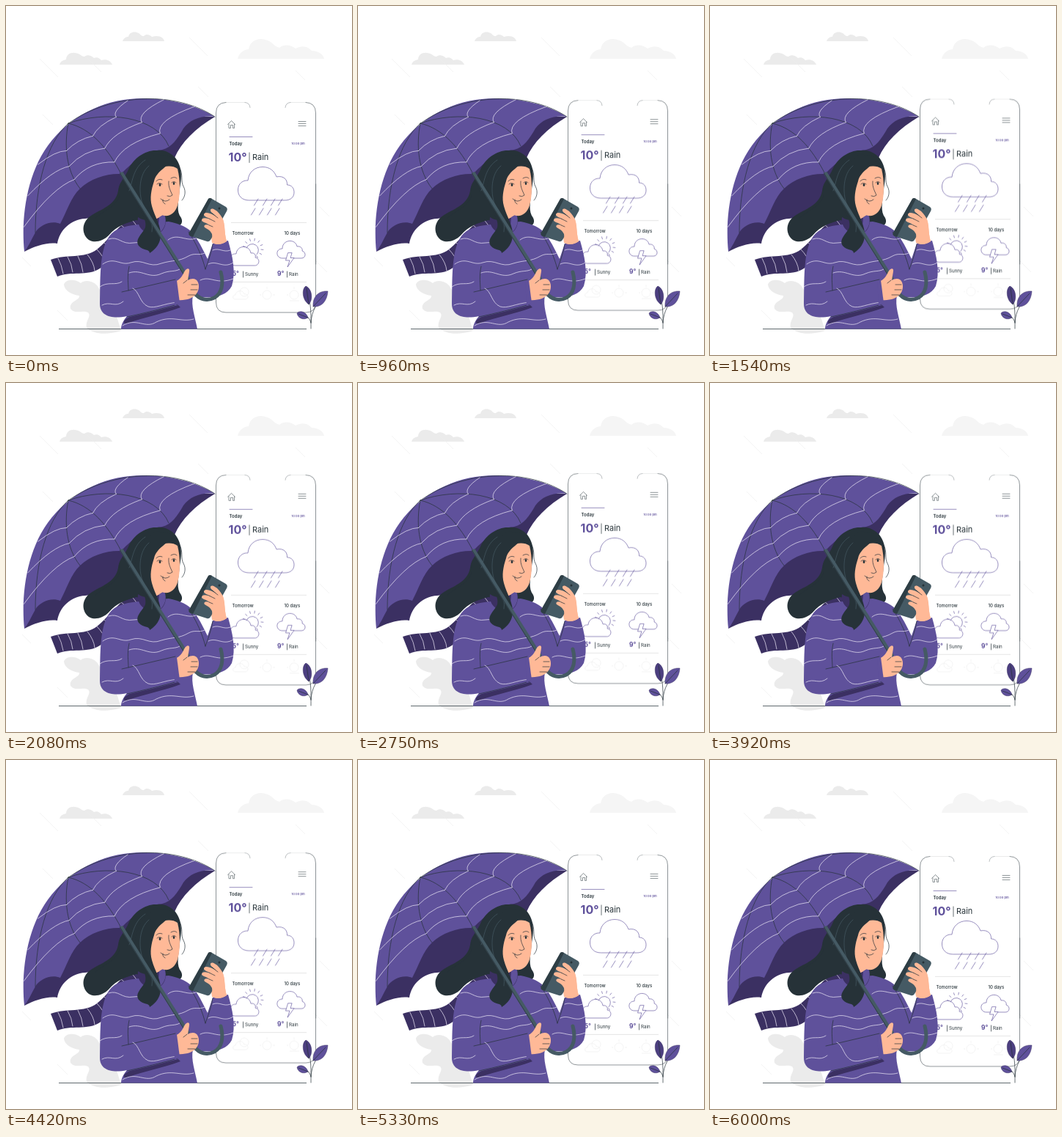
Write an HTML page that moves like this. It is 472 px wide and 476 px high and loops after 6040 ms.

```html
<!DOCTYPE html>
<html lang="en">
<head>
<meta charset="utf-8">
<title>Rainy day forecast</title>
<style>
  html, body { margin: 0; width: 100%; height: 100%; overflow: hidden; background: #fff; }
  svg { display: block; width: 472px; height: 476px; }
  text { font-family: Inter, "Open Sans", sans-serif; fill: #263238; }
  .violet { fill: #5f519b; }
  .deep { fill: #3b3062; }
  .dark { fill: #263238; }
  .slate { fill: #455a64; }
  .skin { fill: #ffb997; }
  .pale { fill: #ebebeb; }
  .line { fill: none; stroke: #263238; stroke-width: .7; stroke-linecap: round; stroke-linejoin: round; }
  .icon { fill: none; stroke: #5f519b; stroke-width: .65; stroke-linecap: round; stroke-linejoin: round; }
  .white { fill: none; stroke: #e6e1f2; stroke-width: .75; stroke-linecap: round; }
  .faint { fill: none; stroke: #ededed; stroke-width: .6; }
  .bold { font-weight: 700; }
  .semi { font-weight: 600; }
  text.violet { fill: #5f519b; }
</style>
</head>
<body>
<svg viewBox="0 0 472 476">
  <!-- sky -->
  <path class="pale" d="M73 80C75 74 79 74 82 73C82 65 90 62 97 64.500C102 66 103 69 107 69C112 65 118 69 120 71C125 69 128 72 130 74C137 72 143 75 145 80Z"/>
  <path class="pale" d="M159 48C161 43 164 42 167 42C168 35 176 34 181 37C184 39 184 41 188 41C192 37 197 40 199 42C209 39 215 43 216 48Z"/>
  <path fill="#f5f5f5" d="M316 72C318 64 323 60 331 59C333 46 346 42 357 47C365 50 365 55 373 57C380 51 390 54 395 58C404 53 412 55 417 61C426 61 433 66 434 72Z"/>
  <g id="drizzle" class="faint"></g>

  <!-- pale bush -->
  <path class="pale" d="M157 443C137 449 120 448 110 439C108 428 117 424 112 418C104 414 94 421 88 413C86 402 101 402 100 395C91 394 80 389 79 380C81 372 95 372 102 378C109 372 122 376 126 384L150 420Z"/>
  <path d="M72 440.500H410" stroke="#37434a" stroke-width=".8"/>

  <!-- forecast panel -->
  <g id="panel">
    <g class="line" stroke-width=".6" opacity=".75">
      <path d="M300 131.500Q286.500 132 286.500 146V404Q286.500 418 300 418H409Q422.500 418 422.500 404V146Q422.500 132 409 131.500"/>
      <path d="M300 131.500H326M388 131.500H409" opacity=".2"/>
      <path d="M326 131.500Q332.500 132 333 138.500M388 131.500Q381.500 132 381 138.500" opacity=".6"/>
    </g>
    <path class="line" stroke-width=".5" opacity=".75" d="M302.500 161.500L307.500 156.500L312.500 161.500M304 161V166.500H306.500V162.500H309.500V166.500H311.500V161M399 157.500H409M399 160.500H409M399 163.500H409"/>
    <path class="icon" d="M305 178.500H336"/>
    <text class="semi" x="304.500" y="190" font-size="6">Today</text>
    <text class="violet semi" x="389.500" y="189.500" font-size="4">10:00 pm</text>
    <text class="violet bold" x="303.500" y="212" font-size="16">10°</text>
    <path class="line" stroke-width=".5" d="M332 200V213.500"/>
    <text x="336" y="210" font-size="11">Rain</text>
    <path class="icon" d="M331 265C322 265 316 259 316.500 250C317 242 323 237.500 330 238C331 226 340 219.500 350 219.500C360 219.500 366 225 369 233C379 231 384 237 383.500 244C390 244 393 249 393 254C393 261 388 265 381 265Z"/>
    <g id="drops" class="icon"></g>
    <path class="faint" style="stroke:#d5d5d5" d="M307 295.500H410M307 376.500H410"/>
    <text x="308.500" y="312" font-size="6" font-weight="500">Tomorrow</text>
    <text x="379.500" y="312" font-size="6" font-weight="500">10 days</text>
    <g id="sunRays" class="icon"></g>
    <path class="icon" d="M328 330A8.500 8.500 0 1 1 342 339"/>
    <path class="icon" d="M312 354C305 354 303 345 307 341C309 338 312 338 314 338C315 326 332 325 334 337C340 336 341 341 340 343C348 345 345 354 340 354Z"/>
    <path class="icon" d="M382 344H377C368 344 367 331 377 331C377 318 395 317 397 328C402 327 405 331 404 334C410 336 409 344 403 344H393"/>
    <path class="icon" d="M384.500 337L381.500 347H387L384 356L393 343.500H388L390 337Z"/>
    <text class="violet bold" x="305" y="368" font-size="8.500">15°</text>
    <text class="violet bold" x="370" y="368" font-size="8.500">9°</text>
    <path class="line" stroke-width=".5" d="M323.500 362V370M383.500 362V370"/>
    <text x="326" y="368" font-size="6.200">Sunny</text>
    <text x="386" y="368" font-size="6.200">Rain</text>
    <g class="faint">
      <path d="M313 400C308 400 309 394 313 394C314 387 324 387 325 393C331 392 332 400 326 400Z"/>
      <circle cx="325" cy="390" r="6"/><circle cx="356" cy="394" r="6"/><circle cx="393" cy="394" r="6"/>
      <path d="M356 383V386M346 394H348M364 394H367M393 383V386M383 394H385M401 394H404M387 402H400"/>
    </g>
  </g>
  <path class="line" stroke-width=".6" opacity=".55" d="M422.700 243V352"/>

  <!-- umbrella -->
  <path class="deep" d="M25 335C39 328 55 322 70 324C73 306 88 291 108 290C128 288 143 270 164 258L230 207C239 186 258 167 285 151L230 150L160 200L90 235L35 290Z"/>
  <path class="violet" d="M25 335C20 287 29 224 62 184C94 145 140 126 186 126C222 126 258 134 285 151C266 149 251 155 242 167C234 181 226 193 213 196C193 198 174 211 157 229C138 228 115 235 101 249C89 260 83 280 74 297C61 292 46 299 40 309C34 320 30 329 25 335Z"/>
  <path class="line" d="M84 161C120 134 174 122 220 128C249 132 270 141 285 151"/>
  <g id="canopy"></g>

  <!-- scarf tail -->
  <path class="deep" d="M184 286C158 290 142 318 124 332C107 345 82 338 61 346L70 369C88 361 112 369 128 358C145 347 152 321 190 310Z"/>
  <path class="white" stroke-width=".6" d="M71 344Q76 353 78 365M84 342Q90 352 91 363M98 341Q104 352 105 363M111 339Q120 350 121 361M124 332Q133 341 136 352M134 323Q145 331 148 340M145 311Q155 320 159 326M157 299Q168 307 172 315M170 290Q179 298 184 311"/>

  <!-- hair behind -->
  <path class="dark" d="M206 197C191 196 174 207 167 223C160 238 155 239 153 252C150 270 133 276 119 284C106 291 102 304 109 315C116 325 131 322 140 313C151 300 163 296 178 292L214 300C232 306 244 299 239 289C232 280 235 268 237 250C239 236 242 222 231 207C224 199 214 196 206 197Z"/>
  <path class="line" d="M237 221C242 230 238 239 242 246C246 253 244 261 240 265M155 249C160 270 134 278 121 290"/>

  <!-- sweater -->
  <path class="violet" d="M148 307C163 298 180 299 193 296L222 294C237 297 250 302 257 313C265 324 270 335 275 345L282 324L303 320C309 341 314 363 308 382C300 398 276 400 255 395C252 409 258 424 261 440.500H157C157 433 162 427 165 423C146 427 128 424 128 406C129 370 126 322 148 307Z"/>
  <path class="deep" d="M169 424C190 419 212 414 235 408L238 411C214 420 190 424 165 433C157 434 161 427 169 424Z"/>
  <path class="line" d="M168 355C165 369 167 379 167 388L231 373M167 388L158 390M165 424C188 419 213 413 234 407M249 308C261 326 268 343 272 359M282 325C280 337 276 348 272 359"/>
  <path class="white" d="M140 318C154 313 157 326 174 323C186 321 191 329 201 325M221 319C234 309 246 322 259 317M132 352C148 341 156 355 170 350C187 344 195 358 212 351C229 346 235 349 249 341C258 336 263 341 271 337M128 383C139 375 149 382 158 376M131 408C142 402 149 412 160 403M173 385C182 389 182 405 194 410C204 413 214 406 234 404M168 364C185 358 195 373 212 365C224 360 230 363 237 359M159 436C178 424 190 441 205 431C226 421 239 432 256 427M282 333C291 329 297 337 306 333M276 352C288 346 296 359 310 350M265 374C279 367 287 381 310 372"/>

  <!-- neck and scarf collar -->
  <path class="skin" d="M190 263L191 291C200 299 213 294 217 285V268Z"/>
  <path class="deep" d="M180 288C191 296 207 292 215 284C221 293 217 307 207 311C192 313 178 304 180 288Z"/>
  <path class="violet" d="M209 288L216 284C220 293 217 305 207 311Z"/>

  <!-- face -->
  <path class="skin" d="M193 238C200 222 222 213 234 222C238 238 238 258 234 272C231 282 224 287 216 286C202 283 192 276 189 264Z"/>
  <path class="dark" d="M231 207C222 218 205 225 202 239C198 251 196 262 199 273C203 288 212 300 211 314C210 324 205 331 196 337C196 331 187 334 181 327C175 318 187 310 190 302C193 290 181 280 178 267C172 247 178 216 205 202Z"/>
  <path class="line" stroke-width="1" d="M205 239Q208 235 213 237M225 235Q230 232 233 235M222 239C221 247 225 253 227 258Q224 261 220 259M211 263Q217 269 223 264M214 264Q213 268 217 270"/>
  <ellipse class="dark" cx="210" cy="244" rx="1.400" ry="2"/>
  <ellipse class="dark" cx="229" cy="242" rx="1.300" ry="2"/>
  <path class="line" d="M206 243Q209 240 213 243M226 241Q229 238 232 241"/>
  <path class="line" style="stroke:#455a64" stroke-width=".5" d="M195 218C181 229 181 255 186 269C191 281 202 291 199 308M190 210C173 221 173 239 168 252"/>

  <!-- shaft, hook and hand -->
  <path d="M157 227L249 373" fill="none" stroke="#455a64" stroke-width="5"/>
  <path d="M155.500 228L246 372" class="line" stroke-width=".6"/>
  <path d="M257 391C263 400 274 403 284 398C295 392 297 378 293 363" fill="none" stroke="#455a64" stroke-width="5" stroke-linecap="round"/>
  <path class="skin" d="M230 376C237 374 240 369 243 363C246 357 251 357 250 362L248 374C253 371 260 371 262 377C264 382 263 388 260 392C256 399 244 402 234 401Z"/>
  <path class="line" stroke-width=".5" d="M247 374L242 378M253 380H261M252 387H261M248 394H258"/>
  <path class="violet" d="M228 376L233 374L237 405L230 409Z"/>

  <!-- handset -->
  <path class="skin" d="M281 323L279 309L272 300L291 281L296 291C299 303 298 311 301 321C294 326 287 326 281 323Z"/>
  <path class="slate" d="M276 263Q278 261 281 263L300 274Q303 276 301 280L279 319Q277 322 274 321L252 314Q248 312 250 309Z"/>
  <path class="dark" d="M276 263L250 309Q248 312 252 314L255 315L281 263Q278 261 276 263Z" opacity=".7"/>
  <circle class="dark" cx="291" cy="276" r="1.500"/>
  <path class="skin" d="M285 278C279 274 277 279 281 282L287 287C280 283 272 280 270 284C269 287 275 288 281 292C274 289 268 288 267 292C267 295 273 295 278 299C272 297 269 299 271 302C274 304 278 305 281 311L282 323C288 326 296 325 301 321C297 308 300 298 295 289C292 284 289 280 285 278Z"/>
  <path class="line" stroke-width=".5" d="M281 283L289 289M277 290L285 294M277 299L282 301"/>

  <!-- sprig -->
  <path class="line" d="M416 440C416 424 417 409 411 389M416 432C417 415 424 406 435 393M416 432C414 424 408 421 400 420"/>
  <g class="violet" stroke="#3b3062" stroke-width=".5">
    <path d="M409 382C403 386 404 401 413 407C419 401 418 386 409 382Z" fill="#4c3f80"/>
    <path d="M439 389C426 388 418 397 419 410C431 411 438 402 439 389Z"/>
    <path d="M397 419C400 415 409 416 412 425C406 429 398 426 397 419Z"/>
  </g>
  <path class="line" stroke-width=".5" d="M410 385L413 407M436 392L419 410M399 420L412 425"/>
</svg>
<script>
const NS = 'http://www.w3.org/2000/svg';
const byId = id => document.getElementById(id);

function addPath(parent, d, cls) {
  const p = document.createElementNS(NS, 'path');
  p.setAttribute('d', d);
  if (cls) p.setAttribute('class', cls);
  parent.append(p);
}

// Slanted streaks: x, y, length along each axis
[[46, 72, 25], [250, 43, 25], [50, 148, 14], [110, 70, 20], [395, 88, 13], [428, 274, 13],
 [22, 343, 12], [70, 415, 14], [420, 345, 18], [262, 110, 14]]
  .forEach(([x, y, n]) => addPath(byId('drizzle'), `M${x} ${y}l${n} ${n}`));

[[344, 263], [356, 263], [367, 263], [377, 263], [340, 276], [351, 276], [362, 276], [373, 276]]
  .forEach(([x, y]) => addPath(byId('drops'), `M${x} ${y}l-5.500 9`));

for (let i = 0; i < 9; i++) {
  const a = -2.9 + i * 0.5, c = Math.cos(a), s = Math.sin(a);
  addPath(byId('sunRays'), `M${337 + 11 * c} ${331 + 11 * s}L${337 + 14 * c} ${331 + 14 * s}`);
}

// Canopy ribs are cubics fanning out from one apex
const apex = [85, 160];
const ribs = [
  [[42, 194], [19, 265], [25, 335]],
  [[79, 190], [82, 225], [101, 249]],
  [[116, 167], [139, 194], [157, 229]],
  [[136, 142], [205, 150], [222, 191]],
  [[145, 119], [232, 116], [285, 151]]
];

function ribPoint([b, c, d], t) {
  const u = 1 - t;
  return [0, 1].map(k => u ** 3 * apex[k] + 3 * u * u * t * b[k] + 3 * u * t * t * c[k] + t ** 3 * d[k]);
}

const canopy = byId('canopy');
ribs.slice(1, 4).forEach(([b, c, d]) => addPath(canopy, `M${apex}C${b} ${c} ${d}`, 'line'));
addPath(canopy, 'M85 160C55 187 40 245 40 309', 'line');
for (const t of [0.4, 0.63, 0.84]) {
  for (let i = 0; i < 4; i++) {
    const p = ribPoint(ribs[i], t), q = ribPoint(ribs[i + 1], t);
    const mid = [0, 1].map(k => {
      const m = (p[k] + q[k]) / 2;
      return m + (apex[k] - m) * 0.2;
    });
    addPath(canopy, `M${p}Q${mid} ${q}`, 'white');
  }
}

byId('panel').animate(
  [0, -9, 0].map(y => ({ transform: `translateY(${y}px)` })),
  { duration: 6040, iterations: Infinity, easing: 'linear' }
);
</script>
</body>
</html>
```
